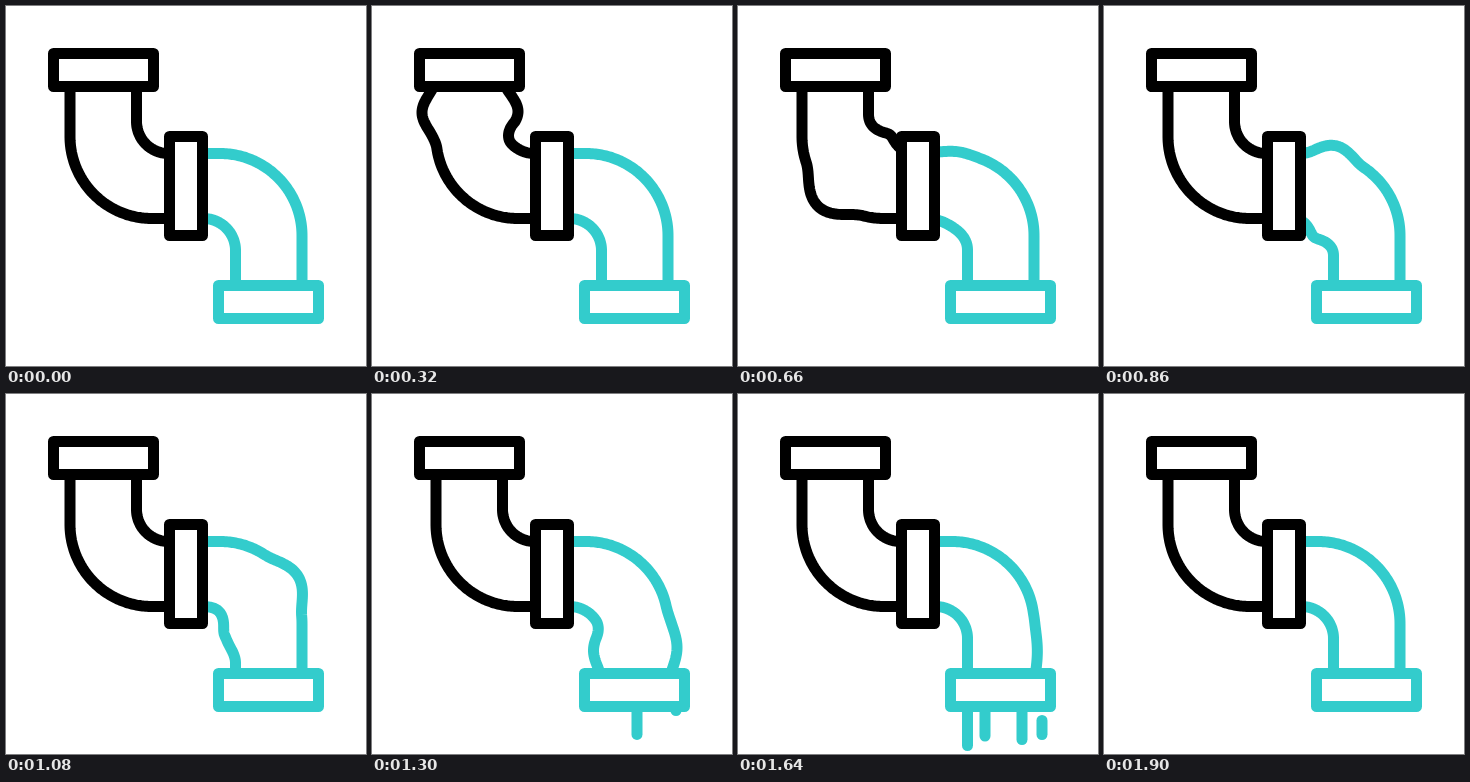
Animation, 360 px wide and 360 px high, one loop 2400 ms. Source, as an HTML page:

```html
<!DOCTYPE html>
<html lang="en">
<head>
<meta charset="utf-8">
<title>Pipe</title>
<style>
  html, body { margin: 0; width: 100%; height: 100%; overflow: hidden; background: #fff; }
  svg { display: block; width: 100vw; height: 100vh; }
  g { fill: none; stroke-width: 11; stroke-linejoin: round; stroke-linecap: round; }
  .water { stroke: #33cccc; }
  .pipe { stroke: #000; }
</style>
</head>
<body>
<svg viewBox="0 0 360 360">
  <g class="water">
    <g id="drips"></g>
    <g transform="rotate(180 180 180)">
      <path id="lowOuter"/>
      <path id="lowInner"/>
      <rect x="47.5" y="47.5" width="100" height="33"/>
    </g>
  </g>
  <g class="pipe">
    <path id="topOuter"/>
    <path id="topInner"/>
    <rect x="47.5" y="47.5" width="100" height="33"/>
    <rect x="163.5" y="130.5" width="33" height="99"/>
  </g>
</svg>
<script>
  const LOOP = 2400, STEP = 20;
  const TOP = 80.5, END = 163.5;

  // Bend centre, radius and bulge direction (1 = away from the centre)
  const outer = { cx: 146, cy: 130.5, r: 82, dir: 1 };
  const inner = { cx: 162.5, cy: 115.5, r: 32, dir: -1 };

  // Bulge keys: time, distance from the cap, height, half width
  const walls = [
    { id: 'topOuter', bend: outer, keys: [[0, 14, 0, 34], [320, 26, 14, 36], [660, 117, 14, 41], [840, 150, 0, 36]] },
    { id: 'topInner', bend: inner, keys: [[0, 14, 0, 32], [320, 25, 15.5, 35], [660, 64, 15, 36], [840, 78, 0, 32]] },
    { id: 'lowOuter', bend: outer, keys: [[600, 185, 0, 32], [860, 163, 9.5, 33], [1300, 26, 9, 42], [1840, 20, 0, 42]] },
    { id: 'lowInner', bend: inner, keys: [[600, 70, 0, 30], [860, 62, 13.6, 32], [1300, 23, 8, 32], [1600, 14, 0, 30]] }
  ];

  // Drips: x, start time, lowest point
  const drips = [[229.5, 1360, 351.5], [247, 1400, 347], [265, 1080, 348], [284, 1400, 351], [304, 1260, 340.5]];
  const GROW = 280, FALL = 200, RIM = 312.5;

  const clamp = v => Math.min(1, Math.max(0, v));
  const mix = (a, b, k) => a + (b - a) * k;
  const byId = id => document.getElementById(id);

  function sample(keys, t) {
    const i = keys.findIndex(k => k[0] > t);
    if (i < 0) return keys[keys.length - 1];
    if (i === 0) return keys[0];
    const a = keys[i - 1], b = keys[i], k = (t - a[0]) / (b[0] - a[0]);
    return a.map((v, n) => mix(v, b[n], k));
  }

  function wallPath({ cx, cy, r, dir }, [, centre, height, width]) {
    const drop = cy - TOP, arc = r * Math.PI / 2;
    const length = drop + arc + Math.max(0, END - cx);
    const count = Math.ceil(length / 1.5);
    let d = '';
    for (let i = 0; i <= count; i++) {
      const s = length * i / count;
      const u = Math.min(1, Math.abs(s - centre) / width);
      const reach = r + dir * height * Math.cos(u * Math.PI / 2) ** 2;
      const angle = clamp((s - drop) / arc) * Math.PI / 2;
      const x = cx - reach * Math.cos(angle) + Math.max(0, s - drop - arc);
      const y = cy + reach * Math.sin(angle) - Math.max(0, drop - s);
      d += (i ? 'L' : 'M') + x.toFixed(2) + ' ' + y.toFixed(2);
    }
    return d;
  }

  for (const wall of walls) wall.node = byId(wall.id);
  const lines = drips.map(([x]) => {
    const line = document.createElementNS('http://www.w3.org/2000/svg', 'line');
    line.setAttribute('x1', x);
    line.setAttribute('x2', x);
    byId('drips').append(line);
    return line;
  });

  function draw(t) {
    for (const { node, bend, keys } of walls) node.setAttribute('d', wallPath(bend, sample(keys, t)));
    drips.forEach(([, start, low], i) => {
      const age = t - start;
      const line = lines[i];
      line.setAttribute('y1', mix(RIM, low, clamp((age - GROW) / FALL)));
      line.setAttribute('y2', mix(RIM, low, clamp(age / GROW)));
      line.style.display = age > 0 && age < GROW + FALL ? '' : 'none';
    });
  }

  const origin = performance.now();
  function tick() {
    const t = (performance.now() - origin) % LOOP;
    draw(Math.floor(t / STEP) * STEP);
    requestAnimationFrame(tick);
  }
  tick();
</script>
</body>
</html>
```
